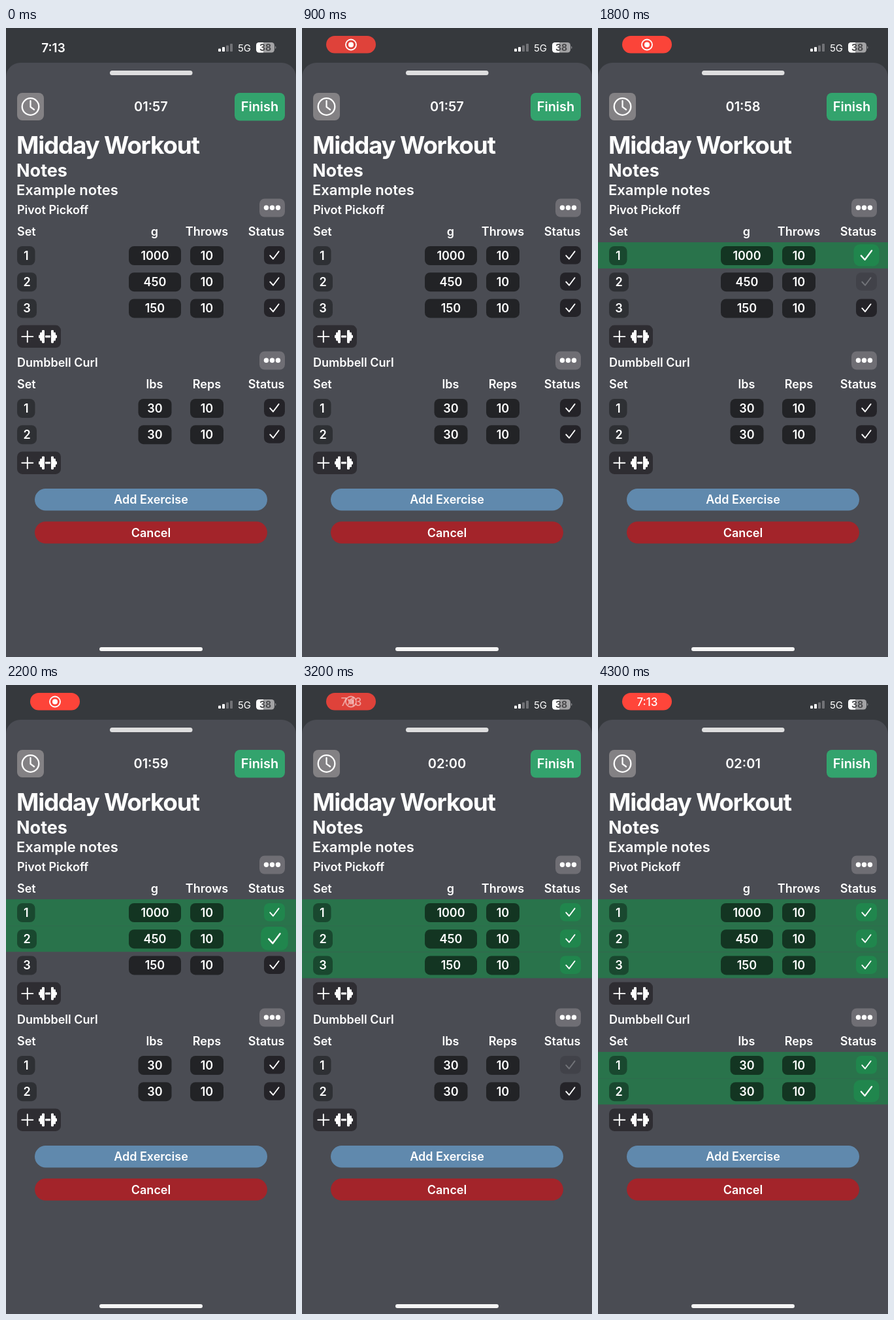
An HTML page for the animation above (4400 ms loop, 444 px wide and 960 px high).

```html
<!DOCTYPE html>
<html lang="en">
<head>
<meta charset="utf-8">
<title>Workout log</title>
<style>
  html, body { margin: 0; width: 100%; height: 100%; overflow: hidden; background: #36393d; }
  svg { display: block; width: 100%; height: 100%; }
  text { font: 600 18px Inter, "Open Sans", sans-serif; fill: #fff; }
  .mid { text-anchor: middle; }
  .line { fill: none; stroke: #fff; stroke-linecap: round; stroke-linejoin: round; }
  .field { fill: rgba(0, 0, 0, .54); }
  .badge { fill: rgba(0, 0, 0, .37); }
  .title { font-size: 37px; font-weight: 700; letter-spacing: -.035em; }
  .heading { font-size: 27px; font-weight: 700; }
  .note { font-size: 22px; }
  .big { font-size: 20px; }
  .time { font-size: 19px; }
  .pill-time { font-size: 17px; font-weight: 500; }
  .network { font-size: 15px; font-weight: 400; }
  .charge { font-size: 14px; font-weight: 700; fill: #4b4b4d; }
</style>
</head>
<body>
<svg id="stage" viewBox="0 0 444 960" preserveAspectRatio="none"></svg>
<script>
const LOOP = 4400, STEP = 100;
const DONE_AT = [1500, 2000, 2700, 3400, 4000];
const PRESS_TIME = 200;
const FIRST_TICK = 1100;

const rect = (x, y, w, h, r, fill, extra = '') =>
  `<rect x="${x}" y="${y}" width="${w}" height="${h}" rx="${r}" fill="${fill}" ${extra}/>`;
const box = (x, y, w, h, cls) => rect(x, y, w, h, 8, 'none', `class="${cls}"`);
const text = (x, y, str, cls = '', extra = '') =>
  `<text x="${x}" y="${y}" class="${cls}" ${extra}>${str}</text>`;
const line = (d, width) => `<path class="line" d="${d}" stroke-width="${width}"/>`;
const dot = (x, y, r) => `<circle cx="${x}" cy="${y}" r="${r}" fill="#fff"/>`;

function statusBar() {
  const bars = [0, 1, 2, 3].map(i => {
    const h = 4.5 + 2.5 * i;
    return rect(325 + 6 * i, 36 - h, 4, h, 1, i < 2 ? '#fff' : '#717276');
  }).join('');
  return text(72.5, 37, '7:13', 'mid time', 'id="clock"') + bars
    + text(365, 36, '5G', 'mid network')
    + rect(383, 22, 28, 15.5, 4.5, '#a3a3a5')
    + '<path d="M394 22h-6.5a4.5 4.5 0 0 0-4.5 4.5v6.5a4.5 4.5 0 0 0 4.5 4.5h6.5z" fill="#fff"/>'
    + '<path d="M412 27.5q3 2.2 0 4.6z" fill="#8b8b8e"/>'
    + text(397, 34.8, '38', 'mid charge')
    + `<g id="pill">${rect(37, 12, 76, 26.5, 13.2, '#ff453a', 'id="pillBack"')}
       <g id="record"><circle class="line" cx="75" cy="25.5" r="8" stroke-width="1.8"/>${dot(75, 25.5, 4)}</g>
       ${text(75.5, 31.5, '7:13', 'mid pill-time', 'id="pillTime"')}</g>`;
}

function header() {
  return rect(17, 99, 41, 42, 8, '#838184')
    + '<circle class="line" cx="37.5" cy="120" r="12.8" stroke-width="2.3"/>'
    + line('M37.5 111V120.5L43 124.5', 2.2)
    + text(222, 127, '01:57', 'mid big', 'id="timer"')
    + rect(350, 99, 77, 42.5, 8, '#33a36d')
    + text(388.5, 127, 'Finish', 'mid big')
    + text(16, 192, 'Midday Workout', 'title')
    + text(16, 227, 'Notes', 'heading')
    + text(16, 255, 'Example notes', 'note');
}

function setRow(y, number, amount, wide, count) {
  const badgeWidth = number === 1 ? 27.5 : 30;
  const w = wide ? 80 : 51;
  return `<g class="row">${rect(0, y - 20, 444, 40, 0, '#29734b', 'class="tint"')}
    ${box(17, y - 14, badgeWidth, 29, 'badge')}${text(17 + badgeWidth / 2, y + 7, number, 'mid')}
    ${box(228 - w / 2, y - 14, w, 29, 'field')}${text(228, y + 7, amount, 'mid')}
    ${box(282, y - 14, 51, 29, 'field')}${text(307.5, y + 7, count, 'mid')}
    <g class="check">${rect(395, y - 14, 32, 27.5, 8, '#242328')}
      ${line(`M404.3 ${y + .3}l4.7 5.2l8.6-11.4`, 1.9)}</g></g>`;
}

function addSetButton(y) {
  const cy = y + 17.3;
  const plates = [[50, 5], [52, 13], [55, 20]].map(([x, h], i) => {
    const w = i ? 4 : 3;
    return rect(x, cy - h / 2, w, h, 1.3, '#fff') + rect(128 - x - w, cy - h / 2, w, h, 1.3, '#fff');
  }).join('');
  return rect(17, y, 67, 34.5, 8, '#2e2d32')
    + line(`M24.3 ${cy}h17M32.8 ${cy - 8.5}v17`, 1.9)
    + plates + rect(60, cy - 1.6, 8, 3.2, .8, '#fff');
}

function exercise(top, name, unit, countLabel, amounts, wide) {
  const rows = amounts.map((a, i) => setRow(top + 87 + 40.2 * i, i + 1, a, wide, 10)).join('');
  return text(17, top + 23.5, name)
    + rect(388, top + .5, 39, 28, 8, '#6f6e74')
    + [398.5, 407.5, 416.5].map(x => dot(x, top + 14.2, 3.7)).join('')
    + text(17, top + 57, 'Set')
    + text(227.5, top + 57, unit, 'mid')
    + text(307.5, top + 57, countLabel, 'mid')
    + text(426.5, top + 57, 'Status', '', 'text-anchor="end"')
    + rows + addSetButton(top + 73 + 40.2 * amounts.length);
}

const wideButton = (y, label, fill) =>
  rect(44, y, 356, 33.5, 16.75, fill) + text(222, y + 23.3, label, 'mid');

const stage = document.getElementById('stage');
stage.innerHTML = rect(0, 0, 444, 960, 0, '#36393d')
  + rect(0, 53, 444, 960, 22, '#4a4c53')
  + rect(159, 65, 126.5, 7, 3.5, '#dededf')
  + statusBar() + header()
  + exercise(260, 'Pivot Pickoff', 'g', 'Throws', [1000, 450, 150], true)
  + exercise(493, 'Dumbbell Curl', 'lbs', 'Reps', [30, 30], false)
  + wideButton(703, 'Add Exercise', '#6089ad')
  + wideButton(753.3, 'Cancel', '#a3242a')
  + rect(143, 945, 158, 6, 3, '#f5f5f5');

const byId = id => document.getElementById(id);
const [clock, pill, pillBack, record, pillTime, timer] =
  ['clock', 'pill', 'pillBack', 'record', 'pillTime', 'timer'].map(byId);
const rows = [...stage.querySelectorAll('.row')].map(row => {
  const check = row.querySelector('.check');
  const tint = row.querySelector('.tint');
  return { tint, check, back: check.querySelector('rect'), y: +tint.getAttribute('y') + 20 };
});

const clamp = v => Math.max(0, Math.min(1, v));
const ramp = (t, from, to) => clamp((t - from) / (to - from));
const smooth = v => v * v * (3 - 2 * v);

// Grows to 1.3 in 200 ms, then settles over the next 300 ms.
const pop = t => 1 + .3 * (t < 200 ? smooth(ramp(t, 0, 200)) : 1 - smooth(ramp(t, 200, 500)));

function drawRow({ tint, check, back, y }, t) {
  const done = t >= 0;
  const scale = done ? pop(t) : 1;
  tint.style.opacity = done ? 1 : 0;
  back.setAttribute('fill', done ? '#20864d' : '#242328');
  check.style.opacity = !done && t >= -PRESS_TIME ? .22 : 1;
  check.setAttribute('transform',
    `translate(411 ${y}) scale(${scale}) translate(-411 ${-y})`);
}

function draw(t) {
  const shown = smooth(ramp(t, 200, 600));
  const swap = smooth(ramp(t, 3000, 3400));
  const pulse = .5 - .5 * Math.cos((t - 950) / 2200 * 2 * Math.PI);
  clock.style.opacity = 1 - shown;
  pill.style.opacity = shown;
  pillBack.style.opacity = t >= 3400 ? 1 : .84 + .16 * pulse;
  record.style.opacity = 1 - swap;
  pillTime.style.opacity = swap;

  const seconds = 118 + Math.floor((t - FIRST_TICK) / 1000);
  const value = Math.max(117, seconds);
  timer.textContent = [Math.floor(value / 60), value % 60]
    .map(n => String(n).padStart(2, '0')).join(':');

  rows.forEach((row, i) => drawRow(row, t - DONE_AT[i]));
}

function frame() {
  const t = performance.now() % LOOP;
  draw(Math.floor(t / STEP) * STEP);
  requestAnimationFrame(frame);
}
frame();
</script>
</body>
</html>
```
